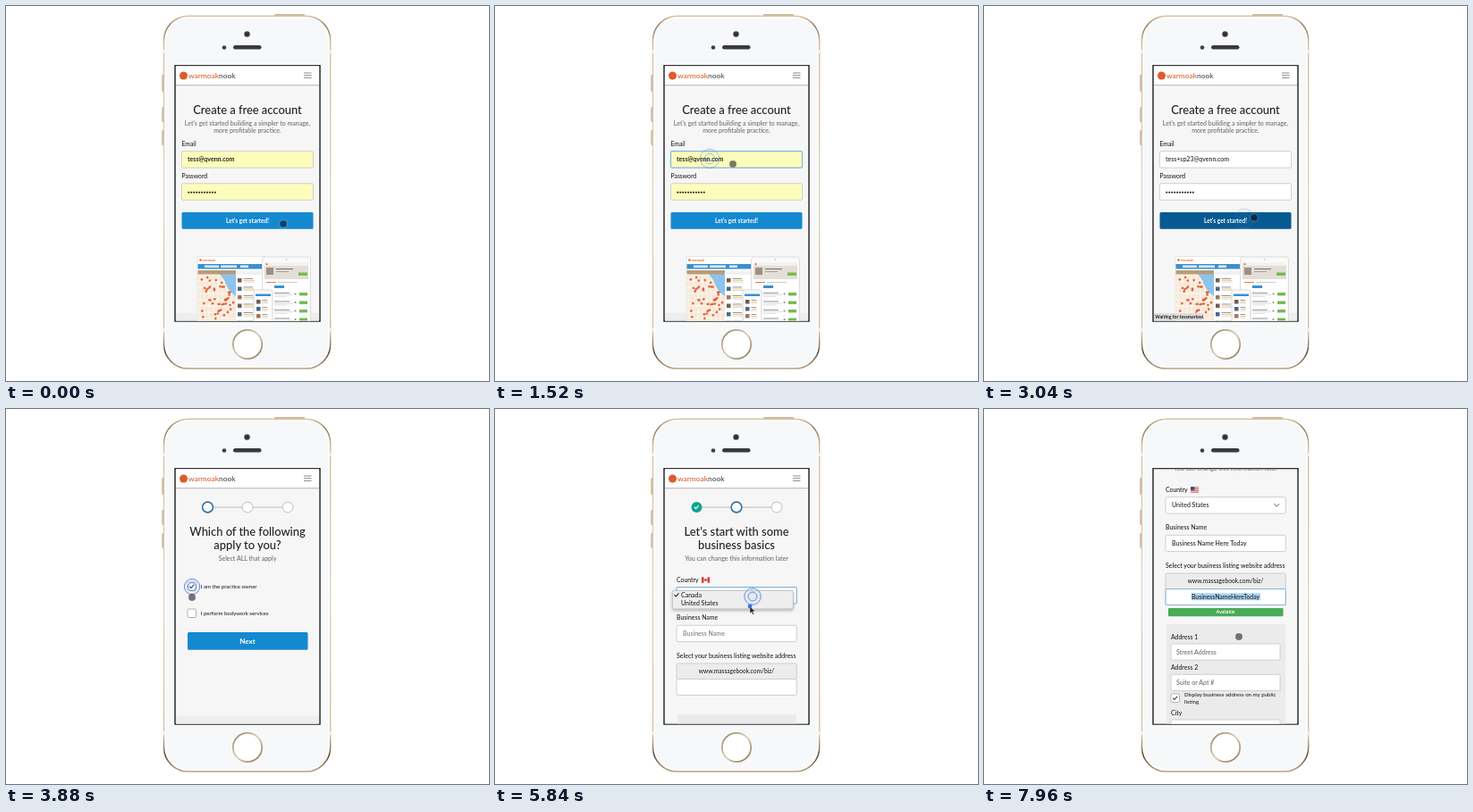
Recreate the animation shown at these times as an HTML page. Size 540 by 420 pixels, loop 8 s.

```html
<!DOCTYPE html>
<html lang="en">
<head>
<meta charset="utf-8">
<title>Sign-up on a phone</title>
<style>
  html, body { margin: 0; width: 100%; height: 100%; overflow: hidden; background: #fff; }
  svg { display: block; width: 540px; height: 420px; font-family: Lato, "Open Sans", sans-serif; font-weight: 500; fill: #222; }
  .mid { text-anchor: middle; }
  .bold { font-weight: 700; }
  .soft { fill: #6c6c6c; }
  .white { fill: #fff; }
  .line { fill: none; stroke-linecap: round; stroke-linejoin: round; }
</style>
</head>
<body>
<svg id="stage" viewBox="0 0 540 420"></svg>
<script>
const LOOP = 8000;
const SCROLL = 101;
const BLUE = '#1589d0';

// Markup helpers
const rect = (x, y, w, h, fill, extra = '') =>
  `<rect x="${x}" y="${y}" width="${w}" height="${h}" fill="${fill}" ${extra}/>`;
const circle = (x, y, r, fill, extra = '') =>
  `<circle cx="${x}" cy="${y}" r="${r}" fill="${fill}" ${extra}/>`;
const text = (x, y, size, words, cls = '', extra = '') =>
  `<text x="${x}" y="${y}" font-size="${size}" class="${cls}" ${extra}>${words}</text>`;
const path = (d, stroke, width, extra = '') =>
  `<path class="line" d="${d}" stroke="${stroke}" stroke-width="${width}" ${extra}/>`;
const group = (id, body, extra = '') => `<g id="${id}" ${extra}>${body}</g>`;
const field = (x, y, w, h, id = '', fill = '#fff') =>
  rect(x, y, w, h, fill, `id="${id}" rx="1.5" stroke="#cbcbcb" stroke-width=".9"`);
const tick = (x, y, color, extra = '') => path(`M${x - 2.2} ${y}l1.6 1.7 2.8-3.4`, color, 1.1, extra);
const checkbox = (x, y, id) =>
  rect(x, y, 9.5, 9.5, '#fff', 'rx="1.5" stroke="#aaa" stroke-width=".9"') +
  tick(x + 4.7, y + 4.8, '#444', `id="${id}"`);

function seeded(seed) {
  return () => (seed = (seed * 16807) % 2147483647) / 2147483647;
}

function phone() {
  const gold = '#cbb598';
  return rect(300, 9, 34, 3, gold, 'rx="1"') +
    [[77, 19], [113, 17], [139, 17]].map(([y, h]) => rect(174.3, y, 2.5, h, gold, 'rx="1"')).join('') +
    rect(176.6, 11.4, 186, 394.6, '#f7f8f9', 'rx="27" stroke="url(#rim)" stroke-width="1.6"') +
    rect(178.2, 13, 182.8, 391.4, 'none', 'rx="25.5" stroke="#fff" stroke-width="1.4"') +
    [[175.5, 49], [361.2, 49], [175.5, 361], [361.2, 361]].map(([x, y]) => rect(x, y, 2.4, 4, '#f4f1ec')).join('') +
    circle(269.5, 31.5, 3.2, '#3c3c44') + circle(269.5, 31.5, 1.3, '#24243a') +
    circle(244, 46.5, 2.3, '#3f3f46') +
    rect(254, 44, 31.5, 4.6, '#3a3a3c', 'rx="2.3"') +
    circle(270, 379, 16.2, '#fff', 'stroke="url(#ring)" stroke-width="1.7"');
}

function header() {
  return rect(190, 67, 160, 21, '#fff') + rect(190, 88, 160, 1, '#c4c4c4') +
    rect(190, 89, 160, 1, '#e6e6e6') +
    circle(198.5, 78, 4.5, '#dd5c2c') +
    text(204, 81, 8.4, '<tspan fill="#dd5c2c">warmoak</tspan><tspan fill="#4a4a4a">nook</tspan>') +
    [74.5, 77.2, 79.9].map(y => rect(333, y, 8.5, 1, '#8a8a8a')).join('');
}

const footer = () => rect(190, 344, 160, 9, '#eee');

function miniMap() {
  const rand = seeded(71);
  let out = rect(214.5, 296, 42.5, 60, '#f6e8d8');
  for (let i = 0; i < 8; i++) out += path(`M214.5 ${301 + i * 7}h42M${217 + i * 5} 301v55`, '#fffaf0', .8);
  out += '<path d="M239 300h18v25l-4-3-5-6-4-9z" fill="#8cc4ee"/>' + rect(214.5, 296, 42.5, 4.5, '#b99c78');
  for (let i = 0; i < 46; i++) {
    const y = 304 + rand() * 46;
    out += circle(217 + rand() * Math.min(38, 24 + (y - 304) * .6), y, 1.3, '#e0613f');
  }
  return out;
}

function miniList(x, y, w, gap, count) {
  let out = '';
  for (let i = 0; i < count; i++) {
    const top = y + i * gap;
    out += rect(x, top, 4.5, 4.5, ['#6d5d50', '#46698b', '#a07757'][i % 3]) +
      rect(x + 6.5, top, w * .7, .9, '#888') + rect(x + 6.5, top + 2, w * .8, .9, '#edc46c') +
      rect(x + 6.5, top + 3.8, w * .8, .7, '#ccc');
  }
  return out;
}

function devices() {
  let out = rect(214, 280.3, 76, 76, '#fff', 'stroke="#dcdcdc" stroke-width=".7"') +
    circle(217.5, 284.5, 1.3, '#e4682c') + text(220, 285.8, 3.4, 'warmoak', 'bold', 'fill="#e4682c"') +
    rect(214.5, 289, 72, 5.5, '#3a8fd0') +
    [[222, 16], [240, 18], [262, 9]].map(([x, w]) => rect(x, 290.4, w, 2.6, '#d9eaf7')).join('') +
    miniMap() +
    rect(258, 297, 28, 4, '#f1f1f1') + miniList(259, 305, 15, 9.5, 6) +
    rect(286.5, 281, 54, 76, '#fafafa', 'rx="3" stroke="#d6d6d6" stroke-width=".8"') +
    circle(313.5, 284, .7, '#aaa') + rect(289, 287.5, 49, 69, '#fff') +
    rect(289, 287.5, 49, 3.5, '#f3f2f0') + circle(291.5, 289.2, 1.1, '#e4682c') +
    rect(289, 291, 49, 15, '#e3ded6') + rect(291, 293, 8, 8, '#a08f80') +
    rect(302, 294, 19, 1.1, '#777') + rect(302, 297, 14, .9, '#999') +
    rect(327, 298.5, 10, 3.4, '#74ba50') +
    rect(291, 309, 11, 1, '#dd8158') + rect(304, 309, 22, 1, '#ccc') +
    rect(300, 313, 11, 3, '#3a8fd0');
  for (let y = 321; y < 354; y += 9.5) {
    out += rect(300, y, 17, .9, '#888') + rect(300, y + 2.3, 21, .7, '#ccc') +
      rect(300, y + 4.2, 14, .7, '#d5d5d5') + circle(323.5, y + 1.5, 1, '#888') +
      rect(328, y, 9, 3.4, '#74ba50');
  }
  return out + rect(277, 318, 21, 40, '#fafafa', 'rx="2.5" stroke="#d0d0d0" stroke-width=".8"') +
    rect(279, 322.5, 17, 33, '#fff') + rect(279, 322.5, 17, 2.5, '#3a8fd0') + miniList(280, 329, 8, 8, 4);
}

function accountPage() {
  return rect(190, 67, 160, 290, '#f6f6f6') + footer() +
    text(270, 121.3, 12.9, 'Create a free account', 'mid') +
    text(270, 134.3, 7, "Let's get started building a simpler to manage,", 'mid soft') +
    text(270, 142, 7, 'more profitable practice.', 'mid soft') +
    text(196.5, 157, 6.8, 'Email') + field(196.5, 162.7, 147, 18.5, 'emailBox') +
    text(203, 174.3, 7, '', '', 'id="email"') +
    text(196.5, 193.3, 6.8, 'Password') + field(196.5, 198.8, 147, 18.5, 'passBox') +
    group('dots', '') +
    rect(196.5, 231, 147, 18.8, BLUE, 'id="startButton" rx="1.5"') +
    text(270, 242.6, 6.5, "Let's get started!", 'mid bold white') + devices();
}

function stepper(done) {
  const active = '#2674b0';
  const first = done
    ? circle(225.5, 110, 6, '#0fa58d') + tick(225.2, 110, '#fff')
    : circle(225.5, 110, 5.9, '#fff', `stroke="${active}" stroke-width="1.6"`);
  return path('M232 110h77', '#bdbdbd', 1) + first +
    circle(270, 110, 5.9, '#fff', `stroke="${done ? active : '#cacaca'}" stroke-width="${done ? 1.6 : 1.1}"`) +
    circle(315, 110, 5.9, '#fff', 'stroke="#cacaca" stroke-width="1.1"');
}

function rolesPage() {
  return rect(190, 67, 160, 290, '#f6f6f6') + footer() + stepper(false) +
    text(270, 142.3, 12.9, 'Which of the following', 'mid') +
    text(270, 156.7, 12.9, 'apply to you?', 'mid') +
    text(270, 169.8, 7, 'Select ALL that apply', 'mid soft') +
    checkbox(203, 194, 'ownerTick') + text(217.7, 201, 6.05, 'I am the practice owner') +
    checkbox(203, 224, 'workTick') + text(217.7, 231, 6.05, 'I perform bodywork services') +
    rect(203, 250, 134.5, 19.7, BLUE, 'id="nextButton" rx="1.5"') +
    text(270, 262.6, 8, '', 'mid bold white', 'id="nextLabel"');
}

function flags() {
  const maple = rect(231, 188.3, 9, 6.4, '#fff') + rect(231, 188.3, 2.5, 6.4, '#d8382f') +
    rect(237.5, 188.3, 2.5, 6.4, '#d8382f') + circle(235.5, 191.5, 1.4, '#d8382f');
  let stripes = rect(231, 188.3, 9, 6.4, '#fff');
  for (let i = 0; i < 4; i++) stripes += rect(231, 188.3 + i * 1.8, 9, .95, '#c9474b');
  return group('maple', maple) + group('stripes', stripes + rect(231, 188.3, 4.4, 3.5, '#36487f'));
}

function businessPage() {
  const y = SCROLL;
  return rect(190, 67, 160, 400, '#f6f6f6') + header() + stepper(true) +
    text(270, 142.3, 12.9, "Let's start with some", 'mid') +
    text(270, 156.7, 12.9, 'business basics', 'mid') +
    text(270, 169.8, 7.1, 'You can change this information later', 'mid soft') +
    text(203, 194, 6.9, 'Country') + flags() +
    field(203, 199.7, 134.3, 18.3, 'countryBox') + text(210, 211.3, 7, '', '', 'id="country"') +
    path('M324.5 207.3l2.7 2.7 2.7-2.7', '#999', 1.1) +
    text(203, 236.3, 6.9, 'Business Name') + field(203, 242.3, 134.3, 18.3, 'nameBox') +
    text(210, 254, 7, '', '', 'id="name"') +
    text(203, 279.2, 7, 'Select your business listing website address') +
    field(203, 285, 134.3, 17.5, '', '#ececec') +
    text(270, 296.3, 6.6, 'www.massagebook.com/biz/', 'mid') +
    field(203, 302.5, 134.3, 18, 'slugBox') +
    rect(232, 307.3, 77, 8, '#a9d3f3', 'id="selection"') +
    text(270, 313.8, 6.9, '', 'mid', 'id="slug"') +
    group('notice', rect(206, 324, 128.5, 9.2, '#df6744', 'id="noticeBar" rx="1"') +
      text(270, 330.4, 5.2, '', 'mid bold white', 'id="noticeText"')) +
    rect(204, 241 + y, 133, 130, '#ebebeb') +
    text(209, 258 + y, 6.9, 'Address 1') + field(209, 263 + y, 122, 18.3) +
    text(215, 274.6 + y, 7, 'Street Address', 'soft') +
    text(209, 292 + y, 6.9, 'Address 2') + field(209, 297.3 + y, 122, 18.3) +
    text(215, 309 + y, 7, 'Suite or Apt #', 'soft') +
    checkbox(209, 319 + y, 'publicTick') +
    text(224, 322.3 + y, 6.15, 'Display business address on my public') +
    text(224, 330.3 + y, 6.15, 'listing') +
    text(209, 343 + y, 6.9, 'City') + field(209, 348 + y, 122, 18) +
    group('menu', rect(198.3, 203.3, 135, 20.6, '#eee', 'rx="2" stroke="#b5b5b5" stroke-width=".8" filter="url(#shade)"') +
      tick(203, 208.3, '#222') + text(208, 210.9, 7, 'Canada') + text(208, 220.3, 7, 'United States'));
}

const pointer = circle(0, 0, 4.1, 'rgba(0,0,0,.52)', 'stroke="rgba(255,255,255,.3)" stroke-width=".8"');
const arrow = '<path d="M0 0v8l1.9-1.7 1.4 3 1.3-.6-1.4-2.9h2.5z" fill="#222" stroke="#fff" stroke-width=".4"/>' +
  circle(0, 0, 2.4, '#3f6fe0');

document.getElementById('stage').innerHTML = `<defs>
  <linearGradient id="rim" x2="0" y2="1"><stop stop-color="#d9c6a8"/><stop offset=".025" stop-color="#8f7858"/><stop offset=".08" stop-color="#d2bea0"/><stop offset=".5" stop-color="#e2d4be"/><stop offset=".9" stop-color="#d2bea0"/><stop offset=".955" stop-color="#5e4c38"/><stop offset="1" stop-color="#b8a385"/></linearGradient>
  <linearGradient id="ring" x2="1" y2="1"><stop stop-color="#8d7759"/><stop offset=".5" stop-color="#dccdb6"/><stop offset="1" stop-color="#7f6a4d"/></linearGradient>
  <filter id="shade" x="-10%" y="-20%" width="120%" height="170%"><feDropShadow dx="0" dy="1.5" stdDeviation="1.5" flood-opacity=".3"/></filter>
  <clipPath id="screen"><rect x="189.6" y="67.4" width="160.8" height="285"/></clipPath>
</defs>` + phone() + rect(189, 66.8, 162, 286.2, '#fff', 'stroke="#1c1c1c" stroke-width="1.4"') +
  group('view',
    group('page0', accountPage() + header()) + group('page1', rolesPage() + header()) +
    group('page2', businessPage()) +
    group('status', rect(190, 344, 54.5, 8.5, '#dcdcdc') + text(191.3, 350.2, 5.2, 'Waiting for tessmarlow.', 'bold')) +
    group('ripple', circle(0, 0, 1, 'rgba(90,150,240,.08)', 'id="outer" stroke="#4b86e0"') +
      circle(0, 0, 1, 'none', 'id="inner" stroke="#4b86e0"')) +
    group('pointer', pointer) + group('arrow', arrow), 'clip-path="url(#screen)"');

const el = {};
document.querySelectorAll('[id]').forEach(node => { if (node.id) el[node.id] = node; });

const show = (node, on) => { node.style.display = on ? '' : 'none'; };
const paint = (node, fill) => node.setAttribute('fill', fill);
const between = (t, a, b) => t >= a && t < b;
const progress = (t, a, b) => Math.min(1, Math.max(0, (t - a) / (b - a)));
const ease = p => p * p * (3 - 2 * p);
const typed = (words, t, a, b) => words.slice(0, Math.floor(progress(t, a, b) * words.length));
const focus = (node, on) => {
  node.setAttribute('stroke', on ? '#82b4de' : '#cbcbcb');
  node.setAttribute('stroke-width', on ? 1.2 : .9);
};

// Pointer stops: time, x, y
const stops = [
  [0, 310, 244], [400, 310, 244], [1100, 240, 171], [1240, 240, 171], [1520, 266, 177],
  [1700, 268, 178], [2500, 291, 238], [2720, 291, 238], [3040, 302, 237], [3340, 302, 237],
  [3640, 208, 199], [3760, 208, 199], [4040, 208, 229], [4160, 208, 229], [4580, 251, 295],
  [4800, 251, 295], [5540, 288, 210], [5660, 288, 210], [5840, 285, 221], [6080, 285, 219],
  [6260, 262, 251], [7320, 262, 251], [7440, 285, 311], [7680, 285, 311], [7920, 285, 255], [8000, 285, 255]
];
// Clicks: time, x, y
const clicks = [
  [1140, 240, 171], [2608, 291, 238], [3680, 208, 199], [4080, 208, 229],
  [4608, 251, 295], [5600, 288, 210], [6000, 285, 219], [6280, 262, 251], [7460, 285, 311]
];
const RIPPLE = 480;

function drawPointer(t) {
  const i = stops.findIndex(stop => stop[0] > t);
  const [a, b] = [stops[i - 1], stops[i]];
  const p = ease(progress(t, a[0], b[0]));
  const place = `translate(${a[1] + (b[1] - a[1]) * p} ${a[2] + (b[2] - a[2]) * p})`;
  const inMenu = between(t, 5660, 6000);
  el.pointer.setAttribute('transform', place);
  el.arrow.setAttribute('transform', place);
  show(el.pointer, !inMenu && !between(t, 6360, 7340));
  show(el.arrow, inMenu);

  const click = clicks.filter(c => between(t, c[0], c[0] + RIPPLE)).pop();
  show(el.ripple, click);
  if (!click) return;
  const age = (t - click[0]) / RIPPLE;
  const radius = 4 + 7 * (1 - (1 - age) ** 2);
  el.ripple.setAttribute('transform', `translate(${click[1]} ${click[2]})`);
  el.ripple.setAttribute('opacity', 1 - age ** 3);
  el.outer.setAttribute('r', radius);
  el.inner.setAttribute('r', radius * .53);
}

function drawAccount(t) {
  const edited = t >= 1640;
  const passEdited = t >= 2140;
  const dotCount = passEdited ? Math.floor(progress(t, 2140, 2460) * 11) : 11;
  el.email.textContent = 'tess' + typed('+sp23', t, 1640, 2040) + '@qvenn.com';
  el.email.style.fontWeight = edited ? 500 : 700;
  paint(el.emailBox, edited ? '#fff' : '#fdfdbb');
  paint(el.passBox, passEdited ? '#fff' : '#fdfdbb');
  focus(el.emailBox, between(t, 1140, 2100));
  focus(el.passBox, between(t, 2100, 2600));
  el.dots.innerHTML = Array.from({ length: dotCount }, (_, i) => circle(204.3 + i * 2.95, 208.8, 1.05, '#222')).join('');
  paint(el.startButton, t >= 2608 ? '#075a91' : BLUE);
}

function drawRoles(t) {
  const saving = t >= 4608;
  show(el.ownerTick, t >= 3680);
  show(el.workTick, t >= 4080);
  paint(el.nextButton, saving ? '#5da4d3' : BLUE);
  el.nextLabel.textContent = saving ? 'Saving...' : 'Next';
}

function drawBusiness(t) {
  const picked = t >= 6000;
  const typing = between(t, 6280, 7460);
  const name = typed('Business Name Here', t, 6340, 6900) + typed(' Today', t, 7180, 7380);
  const free = t >= 7420;
  const selected = t >= 7540;
  show(el.maple, !picked);
  show(el.stripes, picked);
  show(el.menu, between(t, 5620, 6000));
  el.country.textContent = picked ? 'United States' : 'Canada';
  focus(el.countryBox, between(t, 5600, 6280));
  focus(el.nameBox, typing);
  focus(el.slugBox, t >= 7460);
  el.name.textContent = name ? name + (typing ? '|' : '') : 'Business Name';
  paint(el.name, name ? '#222' : '#7b7b7b');
  el.slug.textContent = name.replace(/ /g, '');
  show(el.selection, selected);
  show(el.notice, t >= 6700);
  paint(el.noticeBar, free ? '#48ab55' : '#df6744');
  el.noticeText.textContent = free ? 'Available' : 'Not available';
  el.page2.setAttribute('transform', `translate(0 ${-SCROLL * ease(progress(t, 7680, 7920))})`);
}

function frame(now) {
  const t = now % LOOP;
  const page = t < 3320 ? 0 : t < 4900 ? 1 : 2;
  [el.page0, el.page1, el.page2].forEach((node, i) => show(node, i === page));
  show(el.status, between(t, 2760, 3320));
  [drawAccount, drawRoles, drawBusiness][page](t);
  drawPointer(t);
  requestAnimationFrame(frame);
}
requestAnimationFrame(frame);
</script>
</body>
</html>
```
